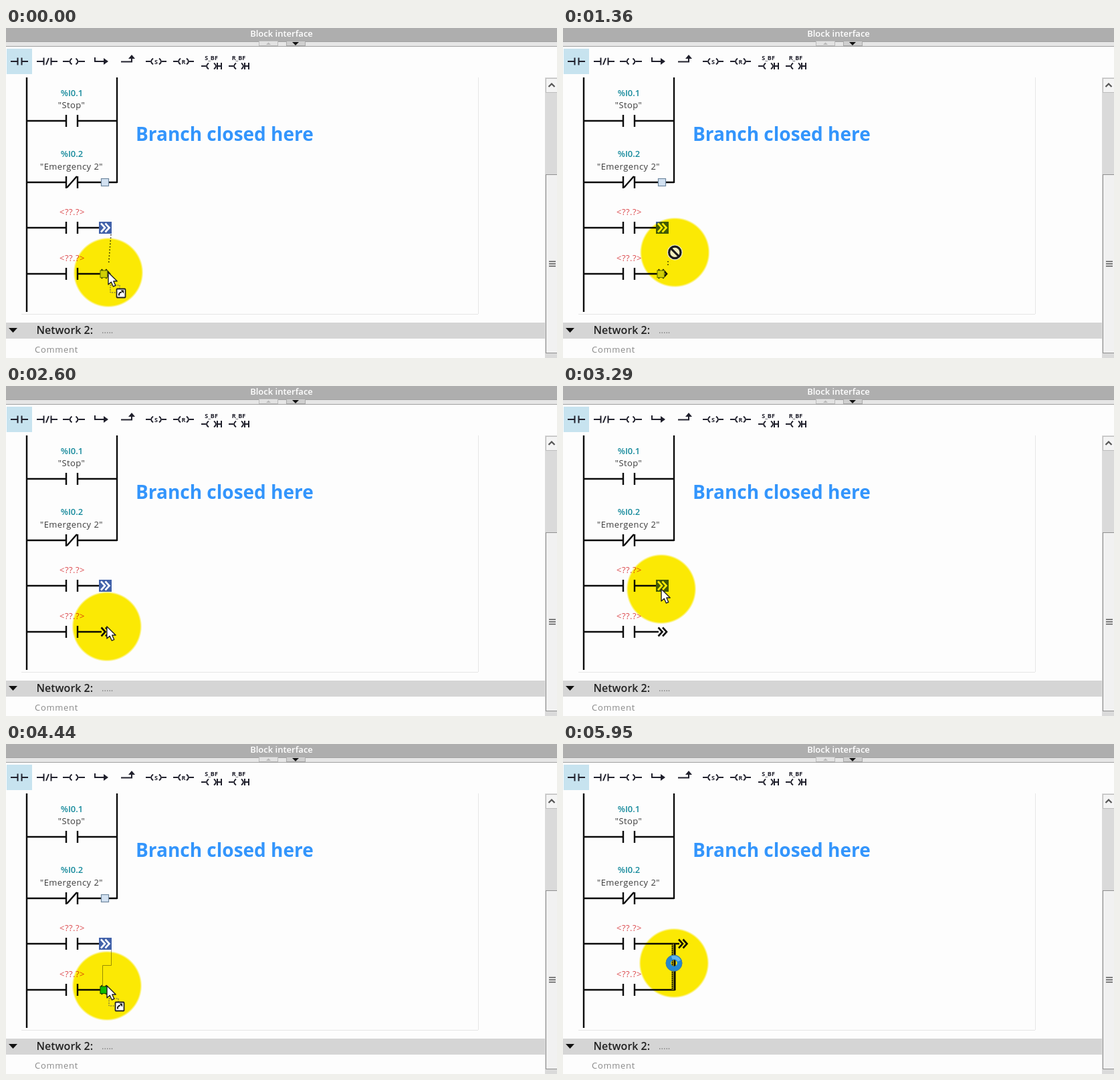
An HTML page for the animation above (6.01 s loop, 824 by 494 pixels).

```html
<!DOCTYPE html>
<html lang="en">
<head>
<meta charset="utf-8">
<title>Closing a ladder branch</title>
<style>
  html, body { margin: 0; width: 100%; height: 100%; overflow: hidden; background: #fdfdfd; }
  svg { display: block; width: 824px; height: 494px; }
  text { font-family: "Open Sans", "Noto Sans", sans-serif; font-size: 13px; }
  .wire { fill: none; stroke: #0b0b0b; stroke-width: 2.4; }
  .icon { fill: none; stroke: #20202c; stroke-width: 2; }
  .tiny { font-size: 9px; font-weight: 700; fill: #20202c; text-anchor: middle; }
  .address { font-weight: 600; fill: #168a9c; text-anchor: middle; }
  .label { fill: #3c3c3c; letter-spacing: .45px; text-anchor: middle; }
  .empty { fill: #dc4c50; letter-spacing: .5px; text-anchor: middle; }
  .handle { fill: #d2e1f1; stroke: #7088a0; stroke-width: 1.2; }
  #glow { mix-blend-mode: multiply; }
</style>
</head>
<body>
<svg viewBox="0 0 824 494">
  <defs>
    <radialGradient id="yellow">
      <stop offset="0" stop-color="#fdeb04"/>
      <stop offset=".94" stop-color="#fdeb04"/>
      <stop offset="1" stop-color="#fdeb04" stop-opacity="0"/>
    </radialGradient>
    <path id="chevrons" d="M1 -6.5L7 0L1 6.5M7.5 -6.5L13.5 0L7.5 6.5" fill="none" stroke-width="2.6"/>
  </defs>
  <rect width="824" height="494" fill="#fdfdfd"/>

  <!-- header -->
  <rect width="824" height="20" fill="#aeaeae"/>
  <rect y="20" width="824" height="7" fill="#e6e6e6"/>
  <path d="M0 20.5H824M0 27.5H824" stroke="#a0a0a0"/>
  <rect x="378.500" y="19.500" width="28" height="7" fill="#e2e2e2" stroke="#bbb"/>
  <rect x="419.500" y="19.500" width="28" height="7" fill="#cfcfcf" stroke="#aaa"/>
  <path d="M389 25L392.500 21.500L396 25Z" fill="#b9b9b9"/>
  <path d="M428 21H438L433 26Z" fill="#111"/>
  <text x="412" y="13" text-anchor="middle" font-weight="600" fill="#fff">Block interface</text>

  <!-- toolbar -->
  <rect x="1" y="31" width="38" height="38" fill="#c7e3ef"/>
  <g id="tools"></g>
  <path class="icon" d="M133 44V50H149"/>
  <path d="M146 45L153 50L146 55Z" fill="#20202c"/>
  <path class="icon" d="M172 50.500H188V45"/>
  <path d="M183 46L188 40L193 46Z" fill="#20202c"/>

  <!-- page frame and scrollbar -->
  <path d="M706.500 74V428M23 428.500H706" fill="none" stroke="#e6e6e6"/>
  <rect x="806" y="74" width="18" height="420" fill="#dadada"/>
  <rect x="807.500" y="75.500" width="18" height="21" fill="#f4f4f4" stroke="#bdbdbd"/>
  <path d="M811.500 88L816 83.500L820.500 88" fill="none" stroke="#555" stroke-width="2.2"/>
  <rect x="807.500" y="219.500" width="18" height="267" fill="#f1f1f1" stroke="#8f8f8f"/>
  <path d="M812 349.500H822M812 353H822M812 356.500H822" stroke="#555" stroke-width="1.500"/>

  <!-- network strip -->
  <rect y="441" width="806" height="24" fill="#d5d5d5"/>
  <path d="M4 449H17L10.500 456Z" fill="#111"/>
  <text x="45.500" y="458" style="font-size:16px" font-weight="600" fill="#222">Network 2:</text>
  <text x="143" y="457" fill="#777">.....</text>
  <text x="43" y="486" fill="#8a8a8a" letter-spacing=".7">Comment</text>

  <!-- ladder -->
  <path class="wire" d="M31 74V425M166 74V232"/>
  <g id="contacts"></g>
  <path class="wire" d="M91 239L106 222M107 139H166M107 231H166"/>
  <text class="address" x="98.500" y="102">%I0.1</text>
  <text class="label" x="98" y="120">"Stop"</text>
  <text class="address" x="98.500" y="193">%I0.2</text>
  <text class="label" x="98" y="212">"Emergency 2"</text>
  <text class="empty" x="99" y="280">&lt;??.?&gt;</text>
  <text class="empty" x="99" y="349">&lt;??.?&gt;</text>
  <text x="194" y="169" style="font-size:28px" font-weight="700" fill="#3395fc">Branch closed here</text>

  <g id="open">
    <path class="wire" d="M107 299H140M107 368H143"/>
    <rect x="139" y="290" width="19" height="18" fill="#4262aa"/>
    <use href="#chevrons" x="141" y="299" stroke="#fff"/>
    <use href="#chevrons" x="141.500" y="368" stroke="#111"/>
  </g>
  <g id="joined">
    <path class="wire" d="M107 299H174M107 368H167"/>
    <use href="#chevrons" x="172" y="299" stroke="#111"/>
    <path d="M165.500 299V368" stroke="#8a8a8a" stroke-width="6"/>
    <path d="M163.500 299V368" stroke="#222" stroke-width="1.500" stroke-dasharray="2 1"/>
    <path d="M167.200 299V369" stroke="#0b0b0b" stroke-width="2.400"/>
  </g>
  <g id="drag">
    <rect class="handle" x="142.500" y="225.500" width="11" height="11"/>
    <rect class="handle" id="end" x="141" y="363" width="10.500" height="10.500"/>
    <path id="rubber" fill="none"/>
  </g>

  <circle id="glow" r="52.500" fill="url(#yellow)"/>

  <g id="cursor">
    <g id="link">
      <rect x="3" y="19" width="14" height="11" fill="none" stroke="#555" stroke-dasharray="2 1.500"/>
      <rect x="12.500" y="24.500" width="13" height="13" rx="1" fill="#fff" stroke="#222" stroke-width="1.800"/>
      <path d="M16 34.500Q15.500 29.500 20 29.500" fill="none" stroke="#111" stroke-width="2"/>
      <path d="M18.500 26.500H23V31.500Z" fill="#111"/>
    </g>
    <path id="arrow" d="M0 0V18L4.300 14.300L7.300 21L10.800 19.500L7.800 13H13.200Z" fill="#fff" stroke="#222" stroke-width="1.400" stroke-linejoin="round"/>
    <g id="ban" fill="none">
      <circle r="10.500" fill="#f3f0bd" stroke="#eeeecf" stroke-width="2"/>
      <circle r="8.700" stroke="#1c1c1c" stroke-width="3.200"/>
      <path d="M-6 -6L6 6" stroke="#1c1c1c" stroke-width="3.200"/>
    </g>
    <g id="busy" fill="none">
      <circle r="8.500" stroke="#2588d0" stroke-width="7.500"/>
      <circle r="12" stroke="#4c7f96"/>
      <path id="spin" d="M0 -8.500A8.500 8.500 0 0 1 8.500 0" stroke="#62b6ee" stroke-width="5"/>
    </g>
  </g>
</svg>
<script>
const LOOP = 6010, STEP = 66.7;
const $ = id => document.getElementById(id);

// time, x, y of the pointer
const path = [
  [0, 153, 366], [70, 153, 365], [480, 157, 333], [600, 158, 321], [690, 158, 321],
  [1230, 166, 332], [1550, 170, 344], [1850, 152, 360], [1920, 151, 359], [2000, 151, 359],
  [2520, 151, 362], [2850, 148, 318], [3070, 147, 304], [3300, 147, 304],
  [3810, 151, 299], [3900, 151, 299], [4350, 151, 362], [4500, 151, 362],
  [4840, 177, 332], [4940, 177, 332], [5300, 170, 330], [5590, 166, 328], [LOOP, 166, 328]
];
const modes = [
  [0, "near"], [200, "ban"], [1700, "snap"], [2600, "idle"], [3960, "ban"],
  [4250, "snap"], [4560, "joined"], [5735, "busy"]
];

const NS = "http://www.w3.org/2000/svg";
function add(parent, tag, attrs, text = "") {
  const el = document.createElementNS(NS, tag);
  for (const key in attrs) el.setAttribute(key, attrs[key]);
  el.textContent = text;
  parent.append(el);
}

for (const y of [139, 231, 299, 368])
  add($("contacts"), "path", { class: "wire", d: `M31 ${y}H90M90 ${y - 9}v18M107 ${y - 9}v18` });

function tool(d) { add($("tools"), "path", { class: "icon", d }); }
function letter(x, y, text) { add($("tools"), "text", { class: "tiny", x, y }, text); }
function coil(x, y, gap, lead) {
  const right = x + lead + gap;
  tool(`M${x} ${y}h${lead}m4 -4.500q-6 4.500 0 9M${right - 4} ${y - 4.5}q6 4.500 0 9M${right} ${y}h${lead}`);
}
tool("M7 50H17M17.500 44.500V55.500M23.500 44.500V55.500M24 50H33");
tool("M46 50H56M56.500 44.500V55.500M67.500 44.500V55.500M68 50H77M60 55L64 45");
coil(85, 50, 14, 9.5);
coil(209, 50, 17, 7);
coil(250, 50, 17, 7);
letter(224.5, 53.5, "S");
letter(265.5, 53.5, "R");
for (const [x, name] of [[292, "S_BF"], [333, "R_BF"]]) {
  letter(x + 15, 47.5, name);
  coil(x, 57, 16, 7);
  tool(`M${x + 24} 52v10M${x + 30} 52v10`);
}

function show(id, on) { $(id).style.display = on ? "" : "none"; }

function pose(t) {
  const i = Math.max(1, path.findIndex(p => p[0] > t));
  const [t0, x0, y0] = path[i - 1], [t1, x1, y1] = path[i];
  const k = (t - t0) / (t1 - t0);
  return [x0 + (x1 - x0) * k, y0 + (y1 - y0) * k];
}

function rubber(mode, x, y) {
  if (mode === "snap") return "M157.500 308V331.500H144.500V363";
  if (mode === "near") return `M157 309L${x + .5} ${y - 13}`;
  return y + 13 < 350 ? `M157 ${y + 13}v6` : "";
}

function draw(now) {
  const time = now % LOOP;
  const t = Math.floor(time / STEP) * STEP;
  const [x, y] = pose(t);
  const mode = modes.filter(m => m[0] <= time).pop()[1];
  const joined = mode === "joined" || mode === "busy";
  const dragging = ["near", "ban", "snap"].includes(mode);
  const snap = mode === "snap";

  $("glow").setAttribute("transform", `translate(${x} ${y})`);
  $("cursor").setAttribute("transform", `translate(${x} ${y})`);
  show("open", !joined);
  show("joined", joined);
  show("drag", dragging);
  show("arrow", mode !== "ban" && mode !== "busy");
  show("link", snap || mode === "near");
  show("ban", mode === "ban");
  show("busy", mode === "busy");

  $("end").style.fill = snap ? "#10cc24" : "";
  $("end").style.stroke = snap ? "#135c1b" : "";
  const line = $("rubber");
  line.setAttribute("d", rubber(mode, x, y));
  line.setAttribute("stroke", snap ? "#999" : "#222");
  line.setAttribute("stroke-width", snap ? 1 : 1.6);
  line.setAttribute("stroke-dasharray", snap ? "none" : "1.5 3");
  $("spin").setAttribute("transform", `rotate(${t * .36})`);
}

const start = performance.now();
function tick() {
  draw(performance.now() - start);
  requestAnimationFrame(tick);
}
tick();
</script>
</body>
</html>
```
